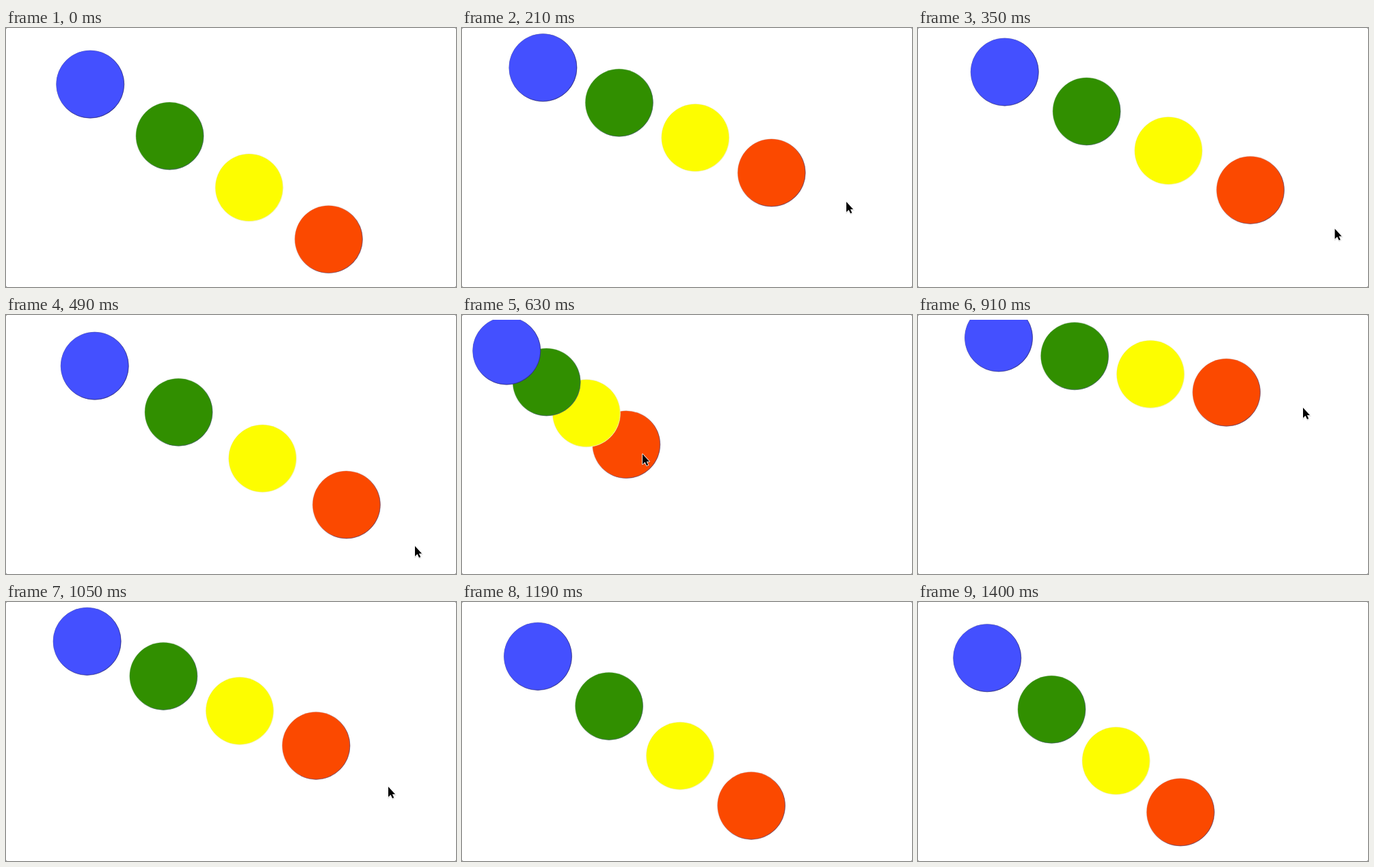
Animation, 658 px wide and 380 px high, one loop 1.47 s. Source, as an HTML page:

```html
<!DOCTYPE html>
<html lang="en">
<head>
<meta charset="utf-8">
<title>Chasing discs</title>
<style>
  html, body { margin: 0; width: 100%; height: 100%; overflow: hidden; background: #fff; }
  svg { display: block; width: 658px; height: 380px; }
</style>
</head>
<body>
<svg viewBox="0 0 658 380">
  <defs>
    <clipPath id="panel"><rect x="7" y="7" width="651" height="373"/></clipPath>
  </defs>
  <rect width="658" height="380" fill="#777"/>
  <rect width="658" height="380" rx="2" fill="#fff"/>
  <g id="discs" clip-path="url(#panel)"></g>
  <g id="cursor">
    <path d="M0 0V15L3.5 11.8L6 17L8.2 16L5.9 11H10Z" transform="translate(.3 1)" fill="#000" opacity=".15" stroke="#000" stroke-width="1.5"/>
    <path d="M0 0V15L3.5 11.8L6 17L8.2 16L5.9 11H10Z" stroke="#fff" stroke-width="1.6" stroke-linejoin="round" paint-order="stroke"/>
  </g>
</svg>
<script>
const LOOP = 1470, STEP = 70, ORIGIN = { x: 7, y: 6.8 };

// Front to back: fill, light rim, dark rim.
const DISCS = [
  ['#4450ff', '#4a50b8', '#30308c'],
  ['#318f00', '#b4cfb4', '#3f6a50'],
  ['#fdfd00', '#eeeeba', '#f0f0a0'],
  ['#fb4900', '#d8b8b4', '#7c4458']
];

// [time, x, y]: offset from one disc to the next, easing after the pointer.
const SPACING = [
  [0, 116.2, 75.8], [70, 114, 67], [210, 111.4, 51.4], [280, 114, 52.5],
  [420, 125.5, 63], [490, 122.7, 67.9], [560, 77, 60], [630, 58.3, 45.8],
  [700, 49, 40], [770, 77, 35], [840, 102, 30], [910, 111, 26.7],
  [980, 112, 33.5], [1050, 111.6, 51], [1120, 109, 65], [1190, 104, 73],
  [1260, 99, 75.4], [1400, 94.2, 75.4]
];
const POINTER = [
  [0, 588, 388], [70, 572, 318], [140, 563, 268], [210, 562, 255],
  [280, 588, 267], [420, 631, 322], [490, 598, 339], [560, 350, 272],
  [630, 264, 204], [700, 254, 186], [770, 430, 170], [840, 540, 148],
  [910, 563, 136], [980, 562, 183], [1050, 559, 271], [1120, 541, 342],
  [1190, 510, 392], [1400, 478, 392]
];

const NS = 'http://www.w3.org/2000/svg';
function add(parent, tag, attrs) {
  const el = document.createElementNS(NS, tag);
  for (const k in attrs) el.setAttribute(k, attrs[k]);
  return parent.appendChild(el);
}

const layer = document.getElementById('discs');
const cursor = document.getElementById('cursor');
const defs = document.querySelector('defs');

const discs = DISCS.map(([fill, light, dark], i) => {
  const grad = add(defs, 'linearGradient', { id: 'rim' + i, x1: 0.1, y1: 0.15, x2: 0.9, y2: 0.85 });
  add(grad, 'stop', { offset: 0.3, 'stop-color': light });
  add(grad, 'stop', { offset: 0.7, 'stop-color': dark });
  const g = document.createElementNS(NS, 'g');
  add(g, 'circle', { r: 49.6, fill: `url(#rim${i})` , stroke: `url(#rim${i})`, 'stroke-width': 0.6 });
  add(g, 'circle', { r: 49.1, cx: -0.2, cy: -0.2, fill });
  layer.prepend(g);
  return g;
});

function sample(keys, t) {
  let i = keys.length - 1;
  while (keys[i][0] > t) i--;
  const a = keys[i], b = keys[Math.min(i + 1, keys.length - 1)];
  const p = a === b ? 0 : (t - a[0]) / (b[0] - a[0]);
  return [1, 2].map(k => a[k] + (b[k] - a[k]) * p);
}

function render(time) {
  const t = Math.floor((time % LOOP) / STEP) * STEP;
  const [dx, dy] = sample(SPACING, t);
  discs.forEach((g, i) => g.setAttribute('transform',
    `translate(${ORIGIN.x + dx * (i + 1)} ${ORIGIN.y + dy * (i + 1)})`));
  cursor.setAttribute('transform', `translate(${sample(POINTER, t)})`);
}

const start = performance.now();
function tick() {
  render(performance.now() - start);
  requestAnimationFrame(tick);
}
tick();
</script>
</body>
</html>
```
